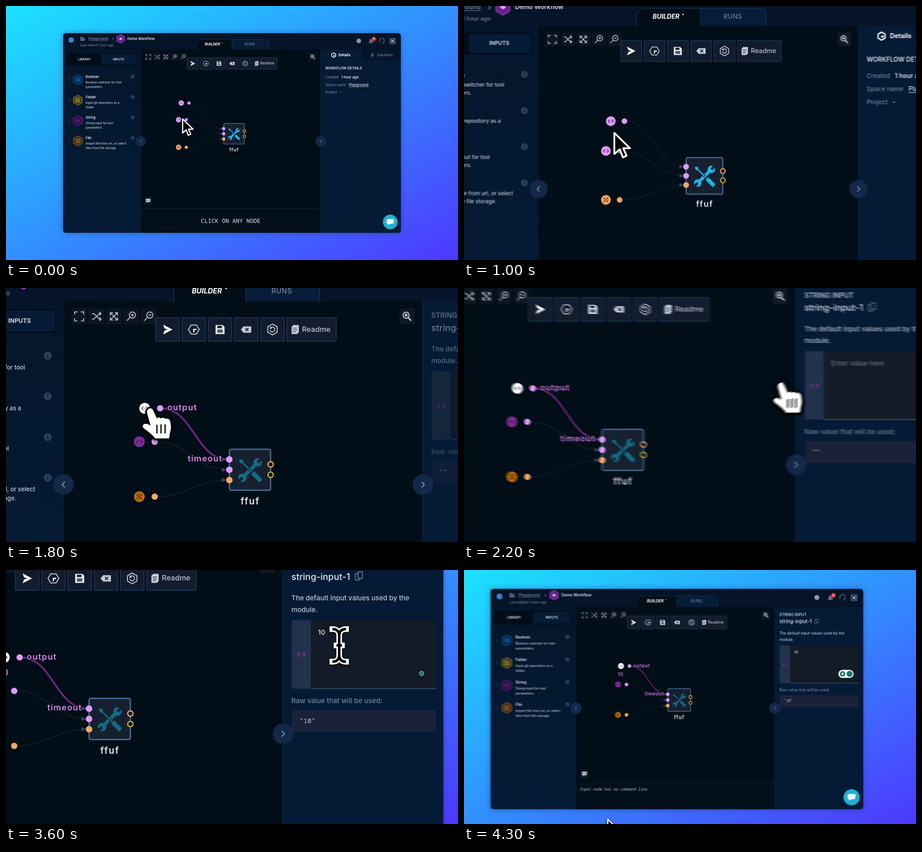
Recreate the animation shown at these times as an HTML page with a canvas. Size 998 by 561 pixels, loop 4400 ms.

```html
<!DOCTYPE html>
<html lang="en">
<head>
<meta charset="utf-8">
<title>Workflow builder demo</title>
<style>
html, body { margin: 0; width: 100%; height: 100%; overflow: hidden; background: #3290ff; }
canvas { display: block; width: 998px; height: 561px; }
</style>
</head>
<body>
<canvas id="stage" width="998" height="561"></canvas>
<script>
const W = 998, H = 561, LOOP = 4400, STEP = 100, SHUTTER = 16;
const HOVER = 1250, CLICK = 1620, IBEAM = 2300, FIRST_KEY = 2700, SECOND_KEY = 2950, LEAVE = 3750;
const SANS = 'Inter, sans-serif', MONO = '"Noto Sans Mono", monospace';
const PINK = '#e09aff', ORANGE = '#f2a766', ICON = '#c3ccd6', MUTED = '#71839b', LIGHT = '#dfe7f0';

const screen = document.getElementById('stage').getContext('2d');
const layer = document.createElement('canvas');
layer.width = W; layer.height = H;
const g = layer.getContext('2d');

// Critically damped spring, 0 to 1.
const spring = (t, start, speed = 5.92) => {
  const x = Math.max(0, (t - start) / 1000 * speed);
  return 1 - (1 + x) * Math.exp(-x);
};
const mix = (a, b, p) => a + (b - a) * p;

function camera(t) {
  const zoom = spring(t, 519), pan = spring(t, 1854), keep = 1 - spring(t, 3650);
  return { s: 1 + zoom * keep, x: (-468 * zoom - 310 * pan) * keep, y: (-162.5 * zoom - 73 * pan) * keep };
}

function pointer(t) {
  const rise = spring(t, 738, 8.2), cross = spring(t, 1850, 8.2), exit = spring(t, LEAVE, 8.2);
  const x = mix(mix(389, 391.5, rise), 756.8, cross), y = mix(mix(246.5, 214.5, rise), 201, cross ** 3);
  return { x: mix(x, 334, exit), y: mix(y, 538.6, exit) };
}

// Drawing helpers
const paths = new Map();
function shape(d, x, y, fill, stroke, width = 1, scale = 1) {
  if (!paths.has(d)) paths.set(d, new Path2D(d));
  g.save();
  g.translate(x, y);
  g.scale(scale, scale);
  if (fill) { g.fillStyle = fill; g.fill(paths.get(d)); }
  if (stroke) { g.strokeStyle = stroke; g.lineWidth = width; g.stroke(paths.get(d)); }
  g.restore();
}
function box(x, y, w, h, fill, stroke, r = 0, width = 1) {
  g.beginPath();
  g.roundRect(x, y, w, h, r);
  paint(fill, stroke, width);
}
function disc(x, y, r, fill, stroke, width = 1) {
  g.beginPath();
  g.arc(x, y, r, 0, 7);
  paint(fill, stroke, width);
}
function paint(fill, stroke, width) {
  if (fill) { g.fillStyle = fill; g.fill(); }
  if (stroke) { g.strokeStyle = stroke; g.lineWidth = width; g.stroke(); }
}
function text(s, x, y, size, color = LIGHT, { weight = 500, font = SANS, align = 'left', gap = 0, underline, halo } = {}) {
  g.font = `${weight} ${size}px ${font}`;
  g.letterSpacing = gap + 'px';
  g.textAlign = align;
  g.textBaseline = 'middle';
  if (halo) {
    g.lineJoin = 'round';
    g.lineWidth = 1.6;
    g.strokeStyle = halo;
    g.strokeText(s, x, y);
  }
  g.fillStyle = color;
  g.fillText(s, x, y);
  if (underline) g.fillRect(x, y + size * .48, g.measureText(s).width, .6);
}
const hexagon = r => {
  const a = r * .87, b = r / 2;
  return `M0,${-r} L${a},${-b} V${b} L0,${r} L${-a},${b} V${-b}Z`;
};

const BRACKETS = 'M-1.7,-2 L-3.4,0 L-1.7,2 M1.7,-2 L3.4,0 L1.7,2 M-1,0h.6 M.5,0h.6';
const FILE_MARK = 'M-2,-2 L2,2 M2,-2 L-2,2 M-3,-1V-3H-1 M1,-3H3V-1 M3,1V3H1 M-1,3H-3V1';
const LENS = 'M4.6,-1.5A3.4,3.4 0 1 1 -2.2,-1.5A3.4,3.4 0 1 1 4.6,-1.5M-1.3,1L-4.8,4.7';
const BUBBLE = 'M-7,-6H4Q6,-6 6,-4V2Q6,4 4,4H-1L-5,7V4H-6Q-8,4 -8,2V-4Q-8,-6 -6,-6Z';

function header() {
  box(126, 60, 746, 36, '#051428');
  disc(144, 75, 6, '#3b82d6');
  shape('M-5,-5H-1L0,-3H5V4H-5Z', 169, 73, '#596b80');
  shape('M-6,-1H6', 169, 73, null, '#26384e');
  text('Playground', 182, 72.5, 8, '#7f91a8', { underline: true });
  shape('M-1.5,-2.5L1.5,0L-1.5,2.5', 236, 73, null, MUTED);
  shape(hexagon(10), 253, 72.5, '#66248a', '#8c46b0');
  shape('M-4,0L0,-3L4,0L0,3Z', 253, 72.5, '#e7a5ff');
  text('Demo Workflow', 268, 72.5, 7.8, LIGHT, { weight: 600 });
  text('Last edited 1 hour ago', 163.5, 87, 7.1, '#71839b');

  shape('M499,96V74H573Q580,76 580,82V96', 0, 0, '#061c38', '#123458');
  shape('M419,97V81L426,74H499V97', 0, 0, '#020e17', '#12304f');
  text('BUILDER', 439, 84.5, 7.9, '#fff', { weight: 'italic 700' });
  disc(477, 81.5, .9, '#fff');
  text('RUNS', 538.5, 84.5, 7.9, '#71839b', { align: 'center', gap: .2 });

  disc(779, 77, 5, '#8d9bad');
  shape('M-5,3Q-3,1 -3,-2Q-2,-5 0,-5Q3,-5 3,-2Q3,1 5,3ZM-1.5,4H1.5', 806, 78, '#52708f', '#52708f');
  disc(812, 73, 5, '#d8232a');
  text('11', 812, 73.2, 5.5, '#fff', { weight: 700, align: 'center' });
  shape('M-5,2V-1A5,5 0 0 1 5,-1V2M-5,0V3M5,0V3Q5,5 1,5', 830, 77, null, '#71839b', 1.2);
  box(847.5, 71.5, 12, 12, '#20334c', '#71839b', 1);
  shape('M-3,-3L3,3M3,-3L-3,3', 853.5, 77.5, null, LIGHT, 1.2);
}

function libraryItem(i, name, lines, fill, ink, mark) {
  const y = 163 + i * 45;
  for (let k = 0; k < 6; k++) box(137 + k % 2 * 3, y - 4 + (k >> 1) * 3.2, 1.2, 1.2, '#42566e');
  shape(hexagon(11.5), 158.7, y, fill, ink, .7);
  shape(mark, 158.7, y, null, ink, .9, 1.2);
  text(name, 176, y - 6, 7.5, LIGHT, { weight: 600 });
  lines.forEach((line, k) => text(line, 176, y + 6.2 + k * 10, 6.6, '#c5d0dd'));
  disc(279.7, y - 7, 4.4, '#2a405a');
  text('i', 279.7, y - 6.8, 6, '#0a1b30', { weight: 700, align: 'center' });
}

function sidebar() {
  const fill = g.createLinearGradient(0, 96, 0, 500);
  fill.addColorStop(0, '#04162b');
  fill.addColorStop(1, '#051b37');
  box(126, 96, 171.5, 405, fill);
  box(133, 104, 156, 27, '#030d1a', null, 3);
  box(211, 106.5, 76, 22, '#051b36', '#06203e', 2);
  text('LIBRARY', 173, 117.5, 6.7, LIGHT, { weight: 600, align: 'center' });
  text('INPUTS', 248.5, 117.5, 6.7, LIGHT, { weight: 600, align: 'center' });
  box(126, 138.8, 171.5, .8, '#0b2540');
  libraryItem(0, 'Boolean', ['Boolean switcher for tool', 'parameters.'], '#082f58', '#176da8', 'M-1,-2.5A2.5,2.5 0 1 0 -1,2.5H1A2.5,2.5 0 1 0 1,-2.5ZM2,0A1.5,1.5 0 1 0 2,.1');
  libraryItem(1, 'Folder', ['Input git repository as a', 'folder.'], '#46421f', '#bd9f38', 'M-3.5,-3H-1L0,-2H3V3H-3.5ZM-2,1H1L-.5,-.5');
  libraryItem(2, 'String', ['String input for tool', 'parameters.'], '#361150', '#8534a8', BRACKETS);
  libraryItem(3, 'File', ['Import file from url, or select', 'files from file storage.'], '#49351f', '#b77828', FILE_MARK);
}

function toolbar() {
  const small = ['M-5,-2V-5H-2M2,-5H5V-2M5,2V5H2M-2,5H-5V2',
    'M-5,-3H-3L3,3H5M-5,3H-3L3,-3H5M3,-5L5,-3L3,-1M3,1L5,3L3,5',
    'M-4,-4L4,4M4,-4L-4,4M-4,-1V-4H-1M1,-4H4V-1M4,1V4H1M-1,4H-4V1',
    LENS + 'M-.4,-1.5H2.8M1.2,-3.1V.1', LENS + 'M-.4,-1.5H2.8'];
  small.forEach((d, i) => {
    const x = 314.4 + i * 19.25;
    box(x - 8.5, 104, 17, 17, '#0d1622');
    shape(d, x, 112.5, null, ICON, .9);
  });
  box(668.7, 104, 17, 17, '#101a27');
  shape('M.5,.5L4.5,4.7', 677.2, 112.5, null, ICON, 1.5);
  disc(676.2, 111.2, 3.4, '#2c3948', ICON, 1);
  disc(676.2, 111.2, 1.4, ICON);

  for (let i = 0; i < 6; i++) box(399.3 + i * 29, 114, i < 5 ? 26 : 54.5, 26, '#131c2d', '#1c3458', .5);
  const y = 127, at = i => 412.3 + i * 29;
  shape('M-5,-5.5L5.5,0L-5,5.5L-3.5,1.2L0,0L-3.5,-1.2Z', at(0), y, '#f0f4f8');
  shape('M-3,-5H3L6,0L3,5H-3L-6,0Z', at(1), y, null, ICON);
  shape('M0,3V0H3', at(1), y, null, '#f0f4f8', 1.4);
  shape('M-5,-5H3L5,-3V5H-5Z', at(2), y, '#e4e9ef');
  box(at(2) - 3, y - 4, 5, 2.5, '#131c2d');
  box(at(2) - 3, y, 6, 3.5, '#4b596b');
  shape('M-6,0L-3,-3.5H5.5V3.5H-3Z', at(3), y, ICON);
  shape('M-1,-1.7L2.5,1.7M2.5,-1.7L-1,1.7', at(3), y, null, '#131c2d');
  shape(hexagon(6), at(4), y, null, ICON);
  shape('M-2,-2A2.7,2.7 0 1 1 -2.7,.7M-2.5,-3V-1.2H-.7', at(4), y, null, ICON);
  shape('M-4,-3L-2,-5H4V3L2,5H-4Z', 553.5, y, ICON);
  shape('M-2.5,-1.5H2M-2.5,.5H2M-2.5,2.5H1', 553.5, y, null, '#2c394b', .7);
  text('Readme', 561, y, 8.1, '#b7c3d1');
}

function toolsIcon(x, y, color) {
  const gap = '#16202f';
  g.save();
  g.translate(x, y);
  g.rotate(-Math.PI / 4);
  box(-12, -2, 24, 4, color);
  for (const side of [-1, 1]) {
    disc(side * 12, 0, 4.7, color);
    box(side > 0 ? 12 : -17, -1.6, 5, 3.2, gap);
  }
  g.rotate(Math.PI / 2);
  box(-14, -1.5, 31, 3, gap);
  box(-16, -.8, 19, 1.6, color);
  shape('M-17,0L-14,-2H-12V2H-14Z', 0, 0, color);
  box(3, -3.6, 14, 7.2, gap);
  box(4, -2.5, 13, 5, color, null, 1);
  g.restore();
}

function graph(hovered, value) {
  const sources = [[387, 214.2], [381, 251.2], [381, 312]], inputs = [270.8, 282.2, 293.6];
  sources.forEach(([x, y], i) => {
    const active = hovered && i === 0, start = x + 17, end = inputs[i], middle = (start + 480) / 2;
    shape(`M${start},${y}C${middle},${y} ${middle},${end} 480,${end}`, 0, 0, null, active ? '#70277f' : '#101d2b', active ? 1.9 : 1.1);
    shape('M-3,-2.4L2,0L-3,2.4Z', 475.3, end, '#334a64');
  });
  sources.forEach(([x, y], i) => {
    const dim = i === 2 ? '#b4660d' : '#7b2b91', lit = i === 2 ? ORANGE : PINK;
    disc(x, y, 6, hovered ? (i ? dim : '#fff') : lit);
    shape(i === 2 ? FILE_MARK : BRACKETS, x, y, null, i === 2 ? '#4b2c09' : '#3c1748', .8, i === 2 ? .8 : .95);
    disc(x + 17, y, 3.5, lit);
  });

  box(480.7, 259.5, 45.5, 45.4, '#16202f', '#4a6d98', 2, 1.4);
  toolsIcon(503.5, 282.6, hovered ? '#146b85' : '#20b4e8');
  inputs.forEach((y, i) => disc(480.6, y, 3.6, i === 2 ? ORANGE : PINK));
  disc(526.3, 276.3, 3, '#111b28', ORANGE, 1.3);
  disc(526.3, 287.8, 3, '#111b28', '#c9b133', 1.3);
  text('ffuf', 503.7, 317.5, 10.2, LIGHT, { weight: 600, align: 'center', gap: .9 });
  if (hovered) {
    const label = { gap: .75, halo: '#14091f' };
    text('output', 412, 213.8, 9.2, PINK, label);
    text('timeout', 473, 270, 9.2, PINK, { ...label, align: 'right' });
    if (value) text(value, 386.5, 231.5, 9.2, PINK, { ...label, align: 'center' });
  }
}

function board(t, value) {
  box(297.5, 96, 397, 405, '#020e17');
  box(297.5, 447, 397, 54, '#030f1a');
  box(297.5, 446.6, 397, .8, '#10283c');
  if (t < CLICK) text('CLICK ON ANY NODE', 496, 475, 12.9, LIGHT, { font: MONO, align: 'center' });
  else text('Input node has no command line.', 304.7, 461.5, 7.5, '#c5d0dd', { font: MONO });
  toolbar();
  box(305.5, 422, 17, 17, '#101a27');
  shape(BUBBLE, 314.5, 430, ICON, null, 1, .72);
  shape('M-4,0h2M0,0h2M-6,0h1', 315, 429.5, null, '#101a27', 1.2);
  graph(t >= HOVER, value);
}

function workflowPanel() {
  box(785, 96, 87, 25.5, '#04142a');
  box(694.5, 121, 177.5, .8, '#0b2540');
  shape(hexagon(5), 723.5, 108.5, null, '#eef3f8', 1.7);
  disc(724.5, 109, 1.6, '#eef3f8');
  text('Details', 734, 108.5, 7.9, '#fff', { weight: 700 });
  shape('M0,-6L4,0L0,6L-4,0Z', 809, 108.5, '#35506f');
  text('Solutions', 819, 108.5, 7.9, MUTED);
  text('WORKFLOW DETAILS', 705, 138, 7.8, LIGHT, { weight: 600 });
  text('Created', 705, 158, 7.6, MUTED);
  text('1 hour ago', 740, 158, 7.8, LIGHT, { weight: 600 });
  text('Space name', 705, 174.5, 7.7, MUTED);
  text('Playground', 757, 174.5, 8, LIGHT, { underline: true });
  text('Project', 705, 191, 7.7, MUTED);
  text('-', 737, 191, 7.7);
}

function assistantBadge(t) {
  const teal = '#15786f';
  if (t < 2600) return;
  if (t < 2900) disc(845, 230.5, 8, teal);
  else if (t < 3700) disc(847.7, 232, 2.5, teal, '#b9d5df', .5);
  else {
    box(822, 222, 30.5, 16, '#fff', null, 8);
    disc(830.5, 230, 5.5, teal);
    shape('M-1.2,1.5Q-2.5,0 -1.7,-1.7Q0,-3 1.7,-1.7Q2.5,0 1.2,1.5ZM-1,2.7H1', 830.5, 230, '#fff', '#fff', .6);
    disc(844.5, 230, 6, teal);
  }
}

function inputPanel(t, value) {
  text('STRING INPUT', 704, 112, 7.7, '#b9c6d6', { weight: 600 });
  text('string-input-1', 704, 125.5, 10, LIGHT);
  shape('M-1,-4H4V3H-1ZM-1,-2H-4V5H1V3', 778.5, 123.8, null, MUTED, .8);
  text('The default input values used by the', 704, 149, 7.5, '#bac7d6');
  text('module.', 704, 161.8, 7.5, '#bac7d6');
  box(704.3, 173.2, 159, 75.5, '#131b27', null, 1);
  box(704.3, 173.2, 21.2, 75.5, '#22314c');
  box(725.5, 248.3, 138, .7, '#53627a');
  shape(BRACKETS, 715, 211, null, '#8636a3', 1, 1.2);
  text(value || 'Enter value here', 733.5, 187, value ? 7.3 : 7.5, value ? LIGHT : '#66768c');
  if (t >= 2500 && t < 3200) box(value.length ? 733 + value.length * 4 : 732.5, 182.5, .7, 9, LIGHT);
  text('Raw value that will be used:', 704, 262.5, 7.6, MUTED);
  box(704.3, 272.7, 159, 24, '#1a2239', null, 1);
  text(`"${value}"`, 713, 284.8, 7.3, '#b6c2d0', { font: MONO });
  assistantBadge(t);
}

function inspector(t, value) {
  const fade = Math.min(1, Math.max(0, (t - CLICK) / 400));
  box(694.5, 96, 177.5, 405, '#051b35');
  if (t < CLICK) workflowPanel();
  else {
    g.globalAlpha = fade;
    inputPanel(t, value);
    g.globalAlpha = 1;
  }
  box(694, 96, .8, 405, '#0b2540');
}

function cursor(t, view, { x, y }) {
  const size = 1 + .65 * (view.s - 1), k = size / 1.65;
  g.save();
  g.setTransform(1, 0, 0, 1, view.x + x * view.s, view.y + y * view.s);
  g.lineJoin = 'round';
  g.shadowColor = '#000a';
  g.shadowBlur = 6;
  g.shadowOffsetY = 2;
  if (t < HOVER || t >= LEAVE) {
    shape('M1,3V34L9,27L13.5,39L19,36.5L14,25.5H24Z', 0, 0, '#000', '#fff', 2.6, size);
  } else if (t < IBEAM) {
    const hand = 'M-2,2Q4,-4 9,3L18,22Q22,17 27,22Q32,18 37,23Q43,20 47,27Q51,44 47,52L45,66H14Q8,57 -11,44Q-17,38 -10,34Q-4,32 4,38L-4,10Q-5,5 -2,2Z';
    shape(hand, 0, 0, '#fff', '#000', 7, k);
    g.shadowColor = 'transparent';
    shape(hand, 0, 0, '#fff', null, 1, k);
    shape('M18,36V55M27,35V55M36,35V55', 0, 0, null, '#111', 3, k);
  } else {
    const beam = 'M-15,-36Q0,-36 0,-21Q0,-36 15,-36M0,-22V22M-15,36Q0,36 0,21Q0,36 15,36M-6,0H6';
    g.lineCap = 'square';
    shape(beam, 0, 0, null, '#fff', 12.5, k);
    g.shadowColor = 'transparent';
    g.lineCap = 'butt';
    shape(beam, 0, 0, null, '#000', 5.5, k);
  }
  g.restore();
}

// The state belongs to t, the pose of camera and pointer to moment.
function scene(t, moment) {
  const view = camera(moment), value = t < FIRST_KEY ? '' : t < SECOND_KEY ? '1' : '10';
  g.setTransform(1, 0, 0, 1, 0, 0);
  const sky = g.createLinearGradient(259, -146, 739, 707);
  sky.addColorStop(0, '#1be2ff');
  sky.addColorStop(.5, '#3190ff');
  sky.addColorStop(1, '#4d38ff');
  box(0, 0, W, H, sky);

  g.setTransform(view.s, 0, 0, view.s, view.x, view.y);
  g.save();
  g.shadowColor = '#0a1c5060';
  g.shadowBlur = 14;
  box(126.3, 60, 745.4, 441, '#051428', null, 6);
  g.restore();
  g.save();
  g.beginPath();
  g.roundRect(126.3, 60, 745.4, 441, 6);
  g.clip();
  header();
  board(t, value);
  sidebar();
  inspector(t, value);
  [[297.1, 1], [694.8, -1]].forEach(([x, side]) => {
    disc(x, 298.6, 11.4, '#13294a');
    shape(`M${side * 1.5},-3.2L${-side * 1.6},0L${side * 1.5},3.2`, x, 298.6, null, '#a9b5c4', .8);
  });
  disc(848.5, 477, 16.2, '#1fb0d4');
  shape(BUBBLE, 851, 476, '#a9e2f0');
  shape(BUBBLE, 848.5, 477, '#fff');
  g.restore();
  cursor(t, view, pointer(moment));
}

function render(t) {
  const from = camera(t - SHUTTER), to = camera(t);
  const travel = Math.abs(from.x - to.x) + Math.abs(from.y - to.y);
  const samples = travel > .6 ? 8 : 1;
  for (let i = 0; i < samples; i++) {
    scene(t, t + ((i + .5) / samples - .5) * SHUTTER);
    screen.globalAlpha = 1 / (i + 1);
    screen.drawImage(layer, 0, 0);
  }
}

const started = performance.now();
let shown = -1;
function tick() {
  const t = Math.floor((performance.now() - started) % LOOP / STEP) * STEP;
  if (t !== shown) render(shown = t);
  requestAnimationFrame(tick);
}
tick();
</script>
</body>
</html>
```
